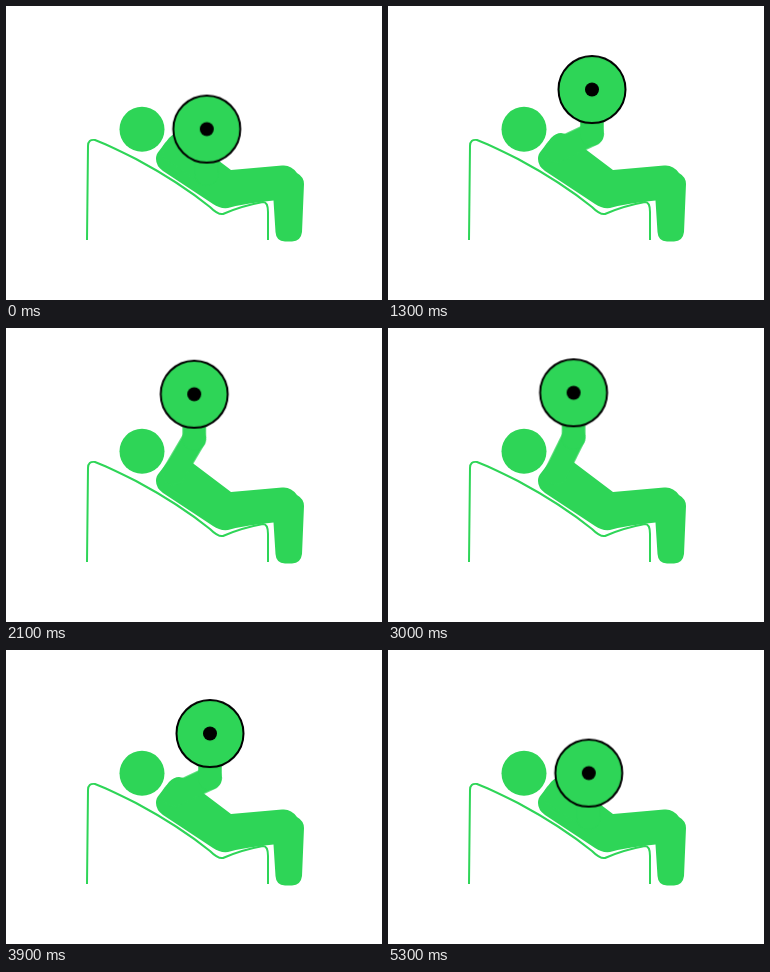
These frames come from a looping animation (376x294 px, 6 s). An HTML page without scripts:

```html
<!DOCTYPE html>
<html lang="en">
<head>
<meta charset="utf-8">
<title>Incline press</title>
<style>
  html, body { margin: 0; width: 100%; height: 100%; overflow: hidden; background: #fff; }
  svg { display: block; width: 376px; height: 294px; }
  :root { --green: #2ed557; --low: 34.6deg; --top: -68deg; --step: 4.275deg; }
  .fill { fill: var(--green); }
  .bench { fill: none; stroke: var(--green); stroke-width: 2; }
  .limb { stroke: var(--green); stroke-width: 23.5; stroke-linecap: round; }
  .plate { fill: var(--green); stroke: #000; stroke-width: 2; }

  /* The upper arm swings; the forearm turns back to stay upright. */
  .upper, .fore { animation: swing 6s -5ms infinite; transform-origin: 0 0; }
  .upper { --dir: 1; }
  .fore { --dir: -1; }
  @keyframes swing {
    0% { transform: rotate(calc(var(--dir) * var(--low))); animation-timing-function: step-end; }
    1.6667% { transform: rotate(calc(var(--dir) * (var(--low) - 2 * var(--step)))); animation-timing-function: steps(22, end); }
    38.3333% { transform: rotate(calc(var(--dir) * var(--top))); animation-timing-function: step-end; }
    50% { transform: rotate(calc(var(--dir) * (var(--top) + var(--step)))); animation-timing-function: steps(23, end); }
    88.3333%, 100% { transform: rotate(calc(var(--dir) * var(--low))); animation-timing-function: step-end; }
  }
</style>
</head>
<body>
<svg viewBox="0 0 376 294">
  <path class="bench" d="M81 234 L82 140 Q82 133 89 134 Q100 138 130 153 Q173 176 204 201 Q212 209 217 208 Q235 200 257 196 Q262 196 262 206 V234"/>
  <circle class="fill" cx="136" cy="123.3" r="22.5"/>
  <path class="fill" d="M150 153 Q150 148 153 145 L163 132 Q168 127 173 127 Q177 127 180 130 L225 164 L276 159.5 Q285 158.5 291 167 Q298 171 298 178 L296 226 Q295 235 286 235.5 H279 Q270 235 269.5 226 L267.5 194.5 Q240 197 222 202 Q214 203 207 198 L157 165 Q150 160 150 153 Z"/>
  <g transform="translate(168 145)">
    <g class="upper">
      <line class="limb" x2="39.8"/>
      <g transform="translate(39.8 0)">
        <g class="fore">
          <line class="limb" y2="-44.5"/>
          <circle class="plate" cy="-44.5" r="33.5"/>
          <circle cy="-44.5" r="7"/>
        </g>
      </g>
    </g>
  </g>
</svg>
</body>
</html>
```
